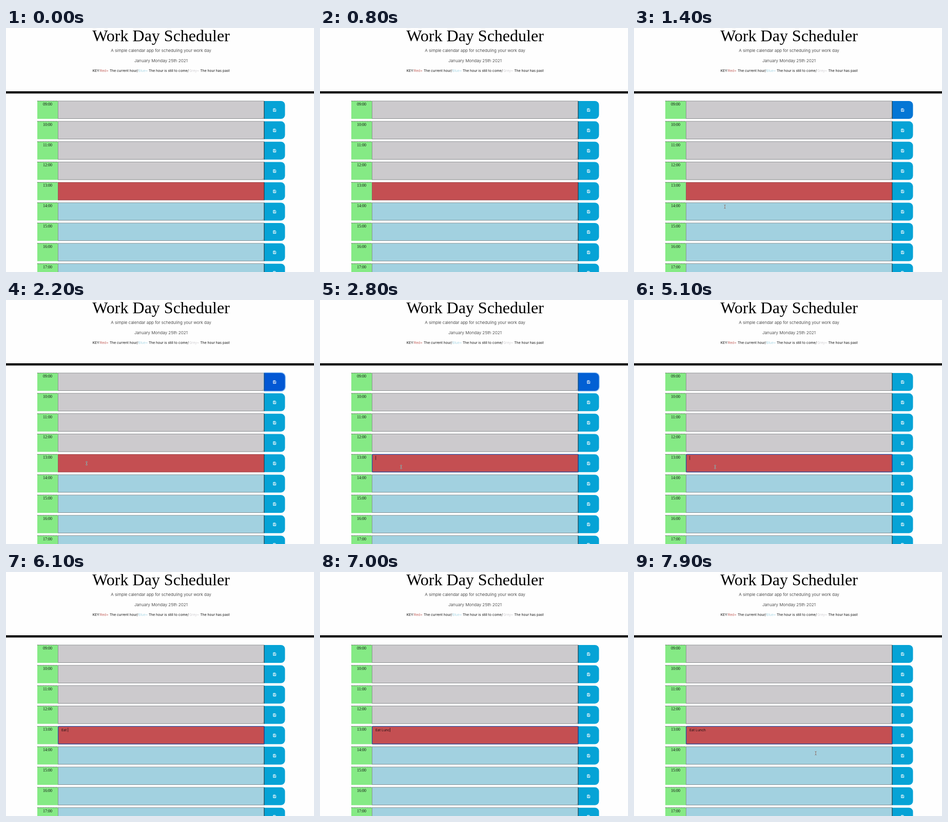
An HTML page with a canvas that plays this animation: 600 px wide and 478 px high, repeating every 8 s.

```html
<!DOCTYPE html>
<html lang="en">
<head>
<meta charset="utf-8">
<title>Work Day Scheduler</title>
<style>
  html, body { margin: 0; width: 100%; height: 100%; overflow: hidden; background: #fefefe; }
  canvas { display: block; width: 600px; height: 478px; }
</style>
</head>
<body>
<canvas id="stage"></canvas>
<script>
const LOOP = 8000, STEP = 100;
const W = 600, H = 478;
const SANS = 'Inter, "Liberation Sans", sans-serif';
const SERIF = '"Liberation Serif", serif';
const ROW_TOP = 143, ROW_PITCH = 39.83, ROW_HEIGHT = 35;
const CURRENT_HOUR = 13;

const canvas = document.getElementById('stage');
const ratio = window.devicePixelRatio || 1;
canvas.width = W * ratio;
canvas.height = H * ratio;
const ctx = canvas.getContext('2d');
ctx.scale(ratio, ratio);

// Each entry: time, x, y
const approach = [[1200, 196, 400], [1400, 177, 350], [2200, 157, 320], [2700, 158, 327], [5600, 158, 327]];
const departure = [[7600, 158, 327], [7900, 354, 355], [8000, 370, 355]];
const keyTimes = [5600, 5700, 5900, 6000, 6200, 6600, 6800, 6900, 7100];
const note = 'Eat Lunch';

const clamp = v => Math.max(0, Math.min(1, v));
const mix = (a, b, p) => a + (b - a) * p;
const blend = (a, b, p) => `rgb(${a.map((v, i) => Math.round(mix(v, b[i], p)))})`;

// Linear value through [time, value] pairs.
function track(points, t, index = 1) {
  const i = points.findIndex(p => p[0] >= t);
  if (i < 0) return points[points.length - 1][index];
  if (i === 0) return points[0][index];
  const a = points[i - 1], b = points[i];
  return mix(a[index], b[index], (t - a[0]) / (b[0] - a[0]));
}

function rect(x, y, w, h, color) {
  ctx.fillStyle = color;
  ctx.fillRect(x, y, w, h);
}

function line(points, color, width) {
  ctx.strokeStyle = color;
  ctx.lineWidth = width;
  ctx.beginPath();
  points.forEach(([x, y], i) => i ? ctx.lineTo(x, y) : ctx.moveTo(x, y));
  ctx.stroke();
}

function text(str, x, y, font, color = '#111', align = 'left') {
  ctx.font = font;
  ctx.fillStyle = color;
  ctx.textAlign = align;
  ctx.fillText(str, x, y);
}

function drawHeader() {
  text('Work Day Scheduler', 302, 25.5, `32px ${SERIF}`, '#000', 'center');
  text('A simple calendar app for scheduling your work day', 302, 47, `300 8.1px ${SANS}`, '#222', 'center');
  text('January Monday 25th 2021', 302, 67, `300 8.2px ${SANS}`, '#222', 'center');
  const legend = [
    ['KEY:', 168.5, '#111'], ['Red=', 183, '#c4615c'], ['The current hour/', 202, '#111'],
    ['Blue=', 258, '#a9d8e6'], ['The hour is still to come/', 278, '#111'],
    ['Grey=', 357, '#d0ced2'], ['The hour has past', 378.5, '#111']
  ];
  legend.forEach(([str, x, color]) => text(str, x, 86, `6.7px ${SANS}`, color));
  rect(0, 124, W, 4.3, '#000');
}

function drawSaveIcon(x, y) {
  ctx.strokeStyle = 'rgba(255,255,255,.9)';
  ctx.lineWidth = 0.8;
  ctx.beginPath();
  ctx.moveTo(x - 2.7, y - 2.7);
  ctx.lineTo(x + 1.5, y - 2.7);
  ctx.lineTo(x + 2.7, y - 1.5);
  ctx.lineTo(x + 2.7, y + 2.7);
  ctx.lineTo(x - 2.7, y + 2.7);
  ctx.closePath();
  ctx.rect(x - 1.5, y + 0.6, 3, 2.1);
  ctx.rect(x - 1.5, y - 2.7, 2.4, 1.7);
  ctx.stroke();
}

function drawButton(y, focus, ring) {
  const corners = [0, 8, 8, 0];
  if (ring > 0) {
    ctx.fillStyle = `rgba(135,190,245,${ring})`;
    ctx.beginPath();
    ctx.roundRect(501.7, y - 1.4, 43.2, ROW_HEIGHT + 2.8, [2, 9, 9, 2]);
    ctx.fill();
  }
  ctx.fillStyle = blend([6, 163, 214], [2, 88, 212], focus);
  ctx.beginPath();
  ctx.roundRect(503, y, 40.5, ROW_HEIGHT, corners);
  ctx.fill();
  rect(502.6, y, 0.9, ROW_HEIGHT, '#123744');
  drawSaveIcon(523.2, y + 17.8);
}

function drawRow(i, t) {
  const hour = 9 + i, y = ROW_TOP + i * ROW_PITCH;
  const current = hour === CURRENT_HOUR;
  const color = current ? '#c44f52' : hour < CURRENT_HOUR ? '#cccacd' : '#a2d1e0';

  rect(61, y, 40.5, ROW_HEIGHT, '#85ea85');
  ctx.setLineDash([1.4, 1.1]);
  line([[61, y], [101, y]], '#222', 0.9);
  ctx.setLineDash([]);
  text(String(hour).padStart(2, '0') + ':00', 81, y + 9, `8px ${SERIF}`, '#111', 'center');

  rect(101.5, y, 401.5, ROW_HEIGHT, color);
  ctx.strokeStyle = current ? '#8c4146' : '#737779';
  ctx.lineWidth = 0.7;
  ctx.strokeRect(101.5, y, 401, ROW_HEIGHT - 0.4);
  if (!current) {
    line([[499.3, y + 33.6], [501.8, y + 31.1]], '#888', 0.5);
    line([[500.8, y + 33.6], [501.8, y + 32.6]], '#888', 0.5);
  }

  const focus = i ? 0 : track([[1300, 0], [1400, 0.6], [1500, 1], [2700, 1], [2800, 0.9], [3000, 0]], t);
  const ring = i ? 0 : track([[1400, 0], [1600, 0.95], [2700, 0.95], [2800, 0.75], [3000, 0]], t);
  drawButton(y, focus, ring);

  if (current && t >= 2800) {
    ctx.strokeStyle = '#2450a8';
    ctx.lineWidth = 1.3;
    ctx.beginPath();
    ctx.roundRect(101.6, y, 401.6, ROW_HEIGHT - 0.4, 1.5);
    ctx.stroke();
  }
}

function caretAlpha(t) {
  if (t < 2800) return 0;
  if (t >= 5600) return 1 - clamp((t - 7500) / 200);
  return track([[3200, 1], [3400, 0], [3600, 0], [3800, 1], [4200, 1], [4400, 0],
    [4500, 0], [4800, 1], [5200, 1], [5400, 0], [5500, 0]], t);
}

function drawNote(t) {
  const typed = note.slice(0, keyTimes.filter(k => k <= t).length);
  const font = `6.8px ${SANS}`;
  text(typed, 108, 311.8, font, '#1a1012');
  const x = 108.3 + ctx.measureText(typed).width;
  rect(x, 305.3, 0.8, 8, `rgba(45,20,24,${caretAlpha(t)})`);
}

function drawCursor(t) {
  const path = [approach, departure].find(p => t >= p[0][0] && t < p[p.length - 1][0]);
  if (!path) return;
  const x = track(path, t, 1), y = track(path, t, 2);
  [['rgba(255,255,255,.75)', 1.9], ['#333', 0.8]].forEach(([color, width]) => {
    line([[x, y - 3], [x, y + 3]], color, width);
    [-1, 1].forEach(s => line([[x - 1.6, y + s * 3.5], [x, y + s * 2.8], [x + 1.6, y + s * 3.5]], color, width));
  });
}

function draw(t) {
  rect(0, 0, W, H, '#fefefe');
  drawHeader();
  for (let i = 0; i < 9; i++) drawRow(i, t);
  drawNote(t);
  drawCursor(t);
}

const start = performance.now();
function tick() {
  const t = (performance.now() - start) % LOOP;
  draw(Math.floor(t / STEP) * STEP);
  requestAnimationFrame(tick);
}
tick();
</script>
</body>
</html>
```
